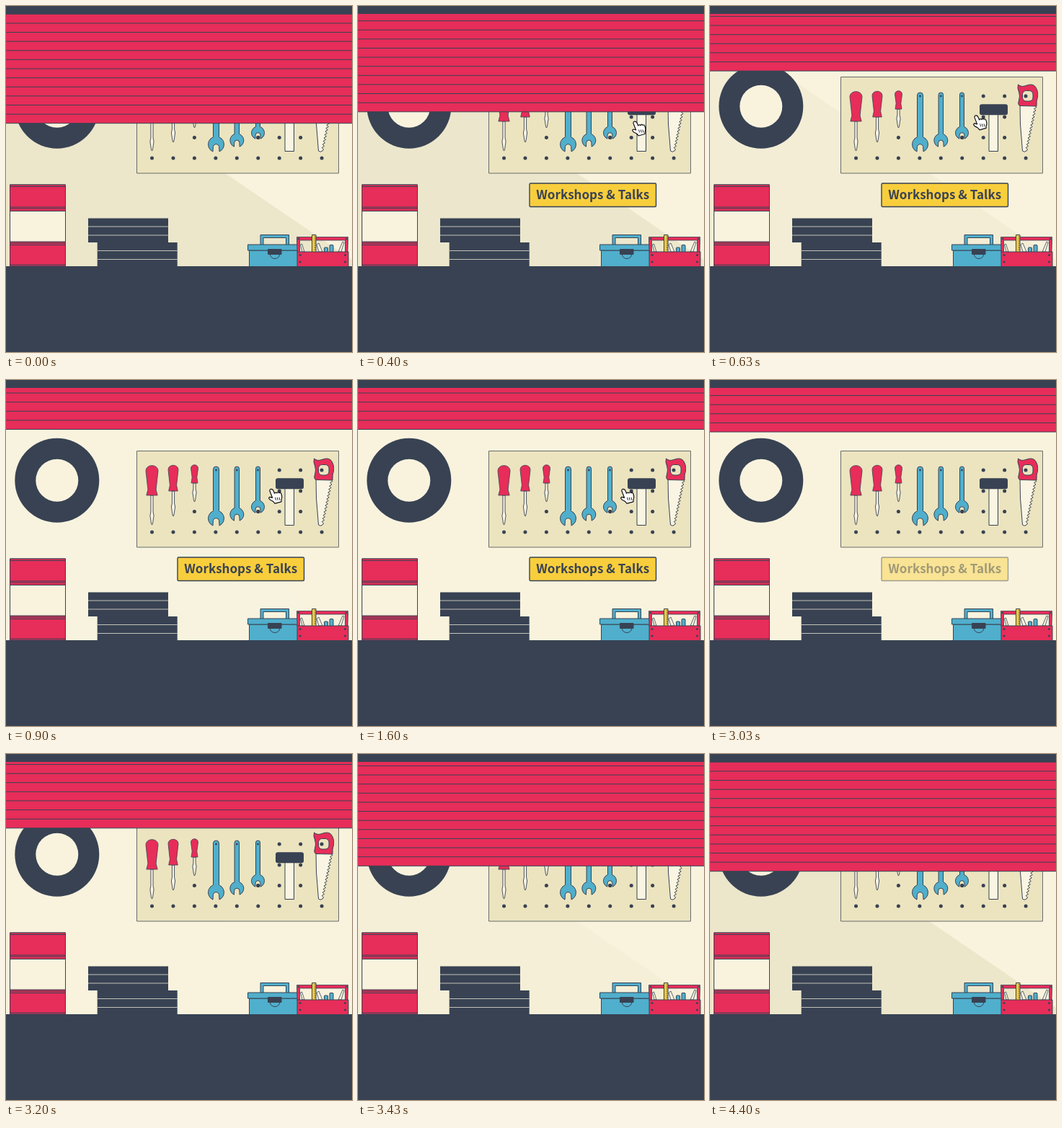
These frames come from a looping animation (480x480 px, 4.77 s). An HTML page with a canvas:

```html
<!DOCTYPE html>
<html lang="en">
<head>
<meta charset="utf-8">
<title>Workshop</title>
<style>
html, body { margin: 0; width: 100%; height: 100%; overflow: hidden; background: #384253; }
canvas { display: block; width: 480px; height: 480px; }
</style>
</head>
<body>
<canvas id="stage" width="480" height="480"></canvas>
<script>
const ctx = document.getElementById('stage').getContext('2d');
const LOOP = 4770;
const NAVY = '#384253', RED = '#e72d59', BLUE = '#50afcc', YELLOW = '#f8ce3c';
const CREAM = '#f9f3de', SHADE = '#ece6cb', BOARD = '#ece4bf', PALE = '#faf5e2';

const clamp = x => Math.min(1, Math.max(0, x));
const span = (t, start, length) => clamp((t - start) / length);

// Cubic ease-in-out with control points (.42, 0) and (.58, 1)
function ease(x) {
  let lo = 0, hi = 1;
  for (let i = 0; i < 20; i++) {
    const u = (lo + hi) / 2, v = 1 - u;
    if (3 * v * v * u * .42 + 3 * v * u * u * .58 + u * u * u < x) lo = u; else hi = u;
  }
  return lo * lo * (3 - 2 * lo);
}

function paint(fill, stroke = NAVY, width = 1) {
  if (fill) { ctx.fillStyle = fill; ctx.fill(); }
  if (stroke) { ctx.strokeStyle = stroke; ctx.lineWidth = width; ctx.stroke(); }
}

function box(x, y, w, h, fill, stroke = NAVY, radius = 0) {
  ctx.beginPath();
  ctx.roundRect(x, y, w, h, radius);
  paint(fill, stroke);
}

function disc(x, y, r, fill, stroke = null) {
  ctx.beginPath();
  ctx.arc(x, y, r, 0, Math.PI * 2);
  paint(fill, stroke);
}

function poly(points, fill, stroke = NAVY, width = 1) {
  ctx.beginPath();
  points.forEach(([x, y]) => ctx.lineTo(x, y));
  ctx.closePath();
  paint(fill, stroke, width);
}

function rule(x1, x2, y, color = NAVY, width = 1) {
  ctx.beginPath();
  ctx.moveTo(x1, y);
  ctx.lineTo(x2, y);
  paint(null, color, width);
}

function wall(shade) {
  box(0, 0, 480, 362, CREAM, null);
  ctx.globalAlpha = shade;
  poly([[0, 24], [304, 232], [480, 352], [480, 362], [0, 362]], SHADE, null);
  ctx.globalAlpha = 1;
}

function tire() {
  disc(70.8, 139.2, 58.5, NAVY);
  disc(70.8, 139.2, 29.5, CREAM);
}

function drum() {
  box(5.5, 248, 77, 113, CREAM);
  box(5.5, 248, 77, 36.5, RED);
  box(5.5, 327, 77, 34, RED);
  [250.5, 279, 281, 329, 331.5, 359].forEach(y => rule(5, 83, y));
}

function books() {
  [[114, 294.5], [126.7, 328]].forEach(([x, y]) => {
    box(x, y, 111, 33.5, NAVY, null);
    rule(x, x + 111, y + 11.5, '#c3c2b6');
    rule(x, x + 111, y + 23.5, '#c3c2b6');
  });
}

function screwdriver(x, w, bottom, tip) {
  const top = 117.7, h = w / 2;
  poly([[x - 1.6, bottom], [x - 1.6, tip - 18], [x - 2.6, tip - 13], [x - 1, tip - 2],
    [x, tip], [x + 1, tip - 2], [x + 2.6, tip - 13], [x + 1.6, tip - 18], [x + 1.6, bottom]], PALE, NAVY, .9);
  ctx.beginPath();
  ctx.moveTo(x - h, top + h);
  ctx.bezierCurveTo(x - h, top - 1.5, x + h, top - 1.5, x + h, top + h);
  ctx.lineTo(x + h * .66, bottom - 8);
  ctx.lineTo(x + h * .9, bottom);
  ctx.lineTo(x - h * .9, bottom);
  ctx.lineTo(x - h * .66, bottom - 8);
  ctx.closePath();
  paint(RED, NAVY, .8);
}

function wrench(x, w, y, r) {
  const h = w / 2, jaw = r * .38, a = Math.asin(h / r);
  ctx.beginPath();
  ctx.arc(x, 120 + h, h, Math.PI, 0);
  ctx.arc(x, y, r, a - Math.PI / 2, Math.PI / 2 - .42);
  ctx.lineTo(x + jaw, y + r * .35);
  ctx.arc(x, y + r * .35, jaw, 0, Math.PI, true);
  ctx.arc(x, y, r, Math.PI / 2 + .42, Math.PI * 1.5 - a);
  ctx.closePath();
  paint(BLUE);
  disc(x, 125, 1.4, NAVY);
}

function saw() {
  ctx.beginPath();
  ctx.moveTo(430, 136);
  ctx.lineTo(430.5, 164);
  ctx.lineTo(433.5, 201);
  ctx.quadraticCurveTo(436, 203.5, 439, 201);
  for (let i = 0; i < 14; i++) {
    const x = 439 + i * .95, y = 200 - i * 4.5;
    ctx.lineTo(x + 1.6, y - 1);
    ctx.lineTo(x - .8, y - 3.5);
  }
  ctx.lineTo(453, 136);
  ctx.closePath();
  paint(PALE);
  ctx.beginPath();
  ctx.moveTo(427.5, 109);
  ctx.quadraticCurveTo(432, 113, 438, 110.5);
  ctx.quadraticCurveTo(447, 107, 451, 111.5);
  ctx.quadraticCurveTo(455.5, 117, 454.5, 126);
  ctx.quadraticCurveTo(452.5, 132, 453, 139);
  ctx.lineTo(430, 138.5);
  ctx.quadraticCurveTo(426.5, 137, 428.5, 131);
  ctx.quadraticCurveTo(430.5, 125, 428.5, 119);
  ctx.quadraticCurveTo(426, 114, 427.5, 109);
  ctx.closePath();
  paint(RED);
  box(433.5, 117.5, 14.5, 14.5, BOARD, NAVY, 5);
  disc(438, 125, 2.5, NAVY);
}

function pegboard() {
  box(181.5, 98.5, 280, 133.5, BOARD, '#666c6d');
  const hole = (col, y) => disc(202.5 + col * 29.45, y, 2.5, NAVY);
  [6, 7].forEach(c => { hole(c, 125); hole(c, 154); hole(c, 182.5); });
  [2, 5].forEach(c => hole(c, 182.5));
  for (let c = 0; c < 9; c++) hole(c, 211);

  screwdriver(202.5, 17, 160, 201);
  screwdriver(232, 14, 154, 189);
  screwdriver(261.5, 10, 143, 169);
  wrench(291.5, 8, 192, 11);
  wrench(320.3, 6.5, 186.5, 9.5);
  wrench(349.5, 6, 176, 9);
  hole(5, 182.5);
  box(387, 148, 12.5, 53.5, PALE);
  box(374, 136.3, 39, 15, NAVY, null, 3);
  saw();
}

function toolbox() {
  ctx.beginPath();
  ctx.rect(353, 317.5, 39.5, 14);
  ctx.rect(357, 321.5, 31.5, 10);
  ctx.fillStyle = BLUE;
  ctx.fill('evenodd');
  paint(null);
  box(337.5, 339, 67, 23, BLUE);
  box(335.5, 331, 69.5, 8, BLUE);
  ctx.beginPath();
  ctx.ellipse(373, 345, 6.5, 5.5, 0, 0, Math.PI);
  paint(null);
  box(363, 337, 19.5, 8, NAVY, null, 1);
}

function tote() {
  const thin = .8;
  poly([[411, 341], [408.5, 331], [410.5, 330], [414, 341]], PALE, NAVY, thin);
  poly([[434, 341], [431, 331], [434, 329], [439, 341]], PALE, NAVY, thin);
  box(441.5, 335, 5, 7, BLUE, NAVY, 1);
  box(449, 331.5, 5, 10, BLUE, NAVY, 1);
  poly([[461, 341], [467, 327], [469, 328], [465, 341]], PALE, NAVY, thin);
  poly([[403.5, 320.5], [474.5, 320.5], [474.5, 325], [474, 342], [470.5, 342], [470.5, 325],
    [407.5, 325], [407.5, 342], [404, 342], [403.5, 325]], RED, NAVY, thin);
  box(424.5, 317.5, 5.5, 24, YELLOW);
  for (let y = 320; y < 341; y += 3) rule(427.5, 430, y, NAVY, thin);
  box(404, 341, 71, 21, RED);
  [408, 470.5].forEach(x => [345.5, 355].forEach(y => disc(x, y, 1.5, NAVY)));
  [406, 472].forEach(x => disc(x, 323, 1.3, NAVY));
}

function shutter(bottom) {
  box(0, 11, 480, bottom - 11, RED, null);
  for (let y = bottom; y > 11; y -= 12.62) rule(0, 480, y);
  box(0, 0, 480, 11, NAVY, null);
}

function label(alpha) {
  if (!alpha) return;
  ctx.globalAlpha = alpha;
  ctx.beginPath();
  ctx.roundRect(238, 246, 175.5, 32.5, 1.5);
  paint(YELLOW, NAVY, 1.4);
  ctx.fillStyle = NAVY;
  ctx.font = '700 17px "Noto Sans CJK JP", "Noto Sans CJK SC", "Noto Sans CJK", sans-serif';
  ctx.textAlign = 'center';
  ctx.fillText('Workshops & Talks', 325.7, 268);
  ctx.globalAlpha = 1;
}

function hand(x, y) {
  ctx.save();
  ctx.translate(x, y);
  ctx.lineJoin = 'round';
  ctx.beginPath();
  ctx.moveTo(2, 3.5);
  ctx.bezierCurveTo(1, 0, 5.5, -.5, 6.8, 2.5);
  ctx.lineTo(8.5, 6.5);
  ctx.quadraticCurveTo(10, 4.5, 12, 6);
  ctx.quadraticCurveTo(13.5, 4, 15, 5.8);
  ctx.quadraticCurveTo(17, 4.8, 17.8, 7);
  ctx.quadraticCurveTo(19.6, 12, 18, 15);
  ctx.lineTo(18, 18);
  ctx.lineTo(9, 20.5);
  ctx.quadraticCurveTo(7, 17, 2.5, 15.5);
  ctx.quadraticCurveTo(-1, 13, 2, 11.5);
  ctx.lineTo(5.5, 12.5);
  ctx.closePath();
  paint('#fff', '#111', 1.2);
  [9.5, 12.2, 14.9].forEach(cx => {
    ctx.beginPath();
    ctx.moveTo(cx, 12);
    ctx.lineTo(cx + 1, 16);
    paint(null, '#111', .9);
  });
  ctx.restore();
}

function draw(t) {
  const lift = ease(span(t, 230, 600)) - ease(span(t, 2949, 600));
  const light = ease(span(t, 230, 800)) - ease(span(t, 2949, 1200));
  const away = (1 - span(t, 30, 760)) ** 3 + span(t, 2530, 500) ** 3;
  wall(1 - light);
  tire();
  pegboard();
  drum();
  books();
  toolbox();
  tote();
  box(0, 361, 480, 119, NAVY, null);
  shutter(162.7 - 94.2 * lift);
  label(clamp(span(t, 230, 150) - span(t, 2949, 150)));
  if (away < 1) hand(364 + 120 * away, 150.8 + 65 * away);
}

function tick(now) {
  draw(now % LOOP);
  requestAnimationFrame(tick);
}
draw(0);
requestAnimationFrame(tick);
</script>
</body>
</html>
```
